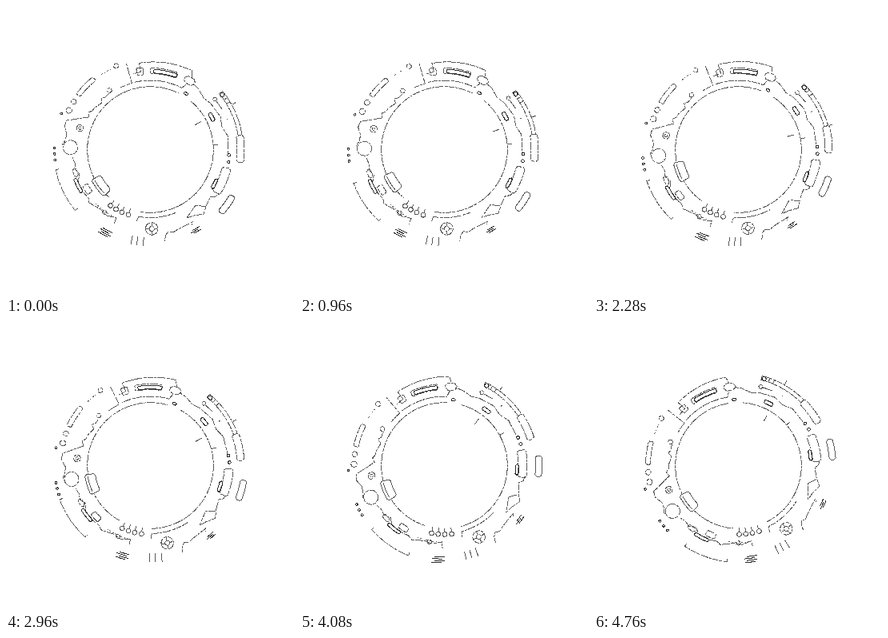
These frames come from a looping animation (360x360 px, 4800 ms). An HTML page:

```html
<!DOCTYPE html>
<html lang="en">
<head>
<meta charset="utf-8">
<title>Rotating dial</title>
<style>
html, body { margin: 0; width: 100%; height: 100%; overflow: hidden; background: #fff; }
svg { display: block; width: 100vw; height: 100vh; }
path { fill: none; stroke: #5a5a5a; stroke-width: 1; shape-rendering: crispEdges; }
.broken { stroke-dasharray: 7 1 3 1 10 2 4 1; }
.dotted { stroke-dasharray: 2 2 1 3; }
.solid { fill: #fff; }
.dark { stroke: #2a2a2a; }
</style>
</head>
<body>
<svg viewBox="0 0 360 360">
  <g id="main"></g>
  <g id="box"></g>
  <g id="tick"></g>
  <g id="rail"></g>
  <g id="pill"></g>
</svg>
<script>
const CX = 180.5, CY = 179.5, LOOP = 4800, STEP = 40;
const broken = [];
const group = id => document.getElementById(id);
const main = group('main');

// Angles in degrees, clockwise on screen, 0 pointing right.
function pt(r, a) {
  const t = a * Math.PI / 180;
  return (CX + r * Math.cos(t)).toFixed(2) + ' ' + (CY + r * Math.sin(t)).toFixed(2);
}

function add(d, cls = 'broken', parent = main) {
  const p = document.createElementNS('http://www.w3.org/2000/svg', 'path');
  p.setAttribute('d', d);
  p.setAttribute('class', cls);
  parent.appendChild(p);
  if (cls === 'broken') broken.push(p);
}

const sweep = (r, a, b) =>
  `A${r} ${r} 0 ${Math.abs(b - a) > 180 ? 1 : 0} ${b > a ? 1 : 0} ${pt(r, b)}`;
const arc = (r, a, b) => `M${pt(r, a)}${sweep(r, a, b)}`;
const band = (r, R, a, b) => `${arc(R, a, b)}L${pt(r, b)}${sweep(r, b, a)}Z`;
const spoke = (r, R, a) => `M${pt(r, a)}L${pt(R, a)}`;
const poly = (...p) => 'M' + p.join('L');

function ring(r, a, s) {
  const [x, y] = pt(r, a).split(' ').map(Number);
  return `M${x - s} ${y}a${s} ${s} 0 1 1 ${2 * s} 0a${s} ${s} 0 1 1 ${-2 * s} 0`;
}

// Rounded block: w along the rim, h across it.
function block(r, a, w, h, c = 1) {
  const da = w / r * 90 / Math.PI, ca = c / r * 180 / Math.PI;
  const i = r - h / 2, o = r + h / 2;
  return `${arc(o, a - da + ca, a + da - ca)}L${pt(o - c, a + da)}L${pt(i + c, a + da)}` +
    `L${pt(i, a + da - ca)}${sweep(i, a + da - ca, a - da + ca)}` +
    `L${pt(i + c, a - da)}L${pt(o - c, a - da)}Z`;
}

function hatch(r, a, n, len, gap) {
  for (let i = 0; i < n; i++) {
    const rr = r + (i - (n - 1) / 2) * gap, d = len / rr * 90 / Math.PI, s = i % 2 ? 1 : -0.5;
    add(arc(rr, a - d + s, a + d + s), 'dark');
  }
}

// Inner rim
add(arc(78.8, -50, 100));
add(arc(78.8, 131, 297));
add(arc(85, 100, 68) + `M${pt(85, 100)}L${pt(92, 101)}`);
add(spoke(79, 85, -4), 'line');

// Top panel
add(`M${pt(97, -103)}L${pt(98, -97)}L${pt(109, -97.5)}${sweep(111.5, -97, -62)}L${pt(103, -60)}`);
add(arc(86.5, -103, -63) + `L${pt(94, -61)}`);
add(block(98.5, -80, 34, 7));
add(block(98, -79, 30, 4.5), 'dark');
add(block(98.5, -97.6, 8, 9));
add(block(99, -60.3, 14, 9, 3));
add(`${arc(86, -116, -105.6)}L${pt(112, -105.6)}`);

// Upper left
add(ring(113, -112.3, 3));
add(arc(112, -123, -115), 'dotted');
add(block(113, -135.7, 29, 6));
add(ring(113, -148, 3.3));
add(ring(113, -154.3, 3.6));
add(ring(120, -158, 1.3), 'dark');
add(ring(90, -124.6, 2.8));
add(poly('129 109', '124 114', '119 115', '120 121', '111 127', '108 131', '103 133',
  '103 139', '76 143', '73 150', '76 160', '74 168', '70 174'));
add(ring(100, 181.5, 9));
add(block(92, 197, 8, 8, 2));
add(ring(92, 197, 1.8));

// Left dots
for (const a of [173.8, 177.4, 181]) add(ring(120, a, 1.4), 'dark');

// Lower left
add(poly('83 189', '86 196', '86 204', '92 210', '90 220', '96 232', '103 240',
  '104 246', '118 254', '126 262', '138 265', '135 272'));
add(block(101, 153.5, 19, 4), 'dark');
add(block(98, 163, 11, 5, 2));
add(block(93, 148, 12, 7));
add(ring(97, 126, 2.6));
add(arc(96, 118, 135), 'dotted');
for (const a of [125.5, 120, 114.5, 108.7])
  add(ring(86, a, 2.8) + spoke(78, 83, a), 'line');
hatch(118, 118.3, 4, 13, 2.4);
for (const a of [94.3, 98.2, 101.7]) add(spoke(110, 121, a), 'line');

// Wheel
add(ring(99, 89, 7.7));
add(ring(99, 89, 3));
add(spoke(102, 106, 89) + spoke(92, 96, 89) + arc(99, 85, 87) + arc(99, 91, 93), 'line');

// Lower right
add(poly('198 294', '200 286', '203 282', '209 283', '215 279', '233 270', '232 274'));
add(poly('226 265', '237 249', '250 251', '247 260', '235 262', '226 265'));
add(poly('250 250', '256 238', '262 238', '266 234'));
hatch(116, 60.5, 3, 10, 2);
add(block(98, 23.4, 34, 11, 2));
add(block(91, 28, 14, 4, 2), 'dark');

// Right side
add(poly('234 97', '241 104', '247 115', '256 122', '268 138', '270 151', '277 162', '278 184'));
add(ring(98.5, 4, 1.8), 'dark');
add(ring(99, 9, 1.8), 'dark');
add(block(86.8, -28, 11, 4.5), 'dark');
add(block(83, -57.5, 5, 3), 'dark');
add(ring(102.5, -38, 2.4));
add(poly('263 119', '270 129'), 'line');
add(spoke(102, 104, -21.5), 'line');
add(band(111, 116, -39, -9));
add(block(113, -0.5, 34, 9, 2));
add(ring(113, -37.3, 2.6), 'dark');
add(spoke(111, 116, -34) + spoke(111, 116, -31), 'line');

// Parts with their own swing
add(block(76.5, 180, 24, 13, 2), 'solid', group('box'));
add(arc(79.5, 173, 187), 'line', group('box'));
add(spoke(64, 72.5, 0) + spoke(117, 122, 0), 'line', group('tick'));
add(`M${pt(117, 153)}L${pt(121, 153)}${sweep(121, 153, 180)}L${pt(117, 180)}`, 'broken', group('rail'));
add(block(118, 35.7, 26, 8, 2), 'line', group('pill'));

const wave = (t, mid, amp, peak, period) => mid + amp * Math.cos(2 * Math.PI * (t - peak) / period);
const turn = (id, a) => group(id).setAttribute('transform', `rotate(${-a} ${CX} ${CY})`);

function hash(n) {
  const v = Math.sin(n * 12.9898) * 43758.5453;
  return v - Math.floor(v);
}

function draw(now) {
  const step = Math.floor(now % LOOP / STEP), t = step * STEP;
  const a = 36.2 * Math.pow(t / 4760, 2.45);
  turn('main', a);
  turn('box', a + wave(t, 17.2, 19, 0, 8400));
  turn('tick', a + wave(t, 18.6, 10.3, 0, 4100));
  turn('rail', a + wave(t, 14.7, 5.5, 1200, 3600));
  turn('pill', a + wave(t, 5.3, -5.3, 0, 7800));
  // The small breaks in the outlines shimmer.
  broken.forEach((p, i) => { p.style.strokeDashoffset = Math.floor(hash(step * 61 + i + 1) * 29); });
}

const start = performance.now();
function tick() {
  draw(performance.now() - start);
  requestAnimationFrame(tick);
}
tick();
</script>
</body>
</html>
```
